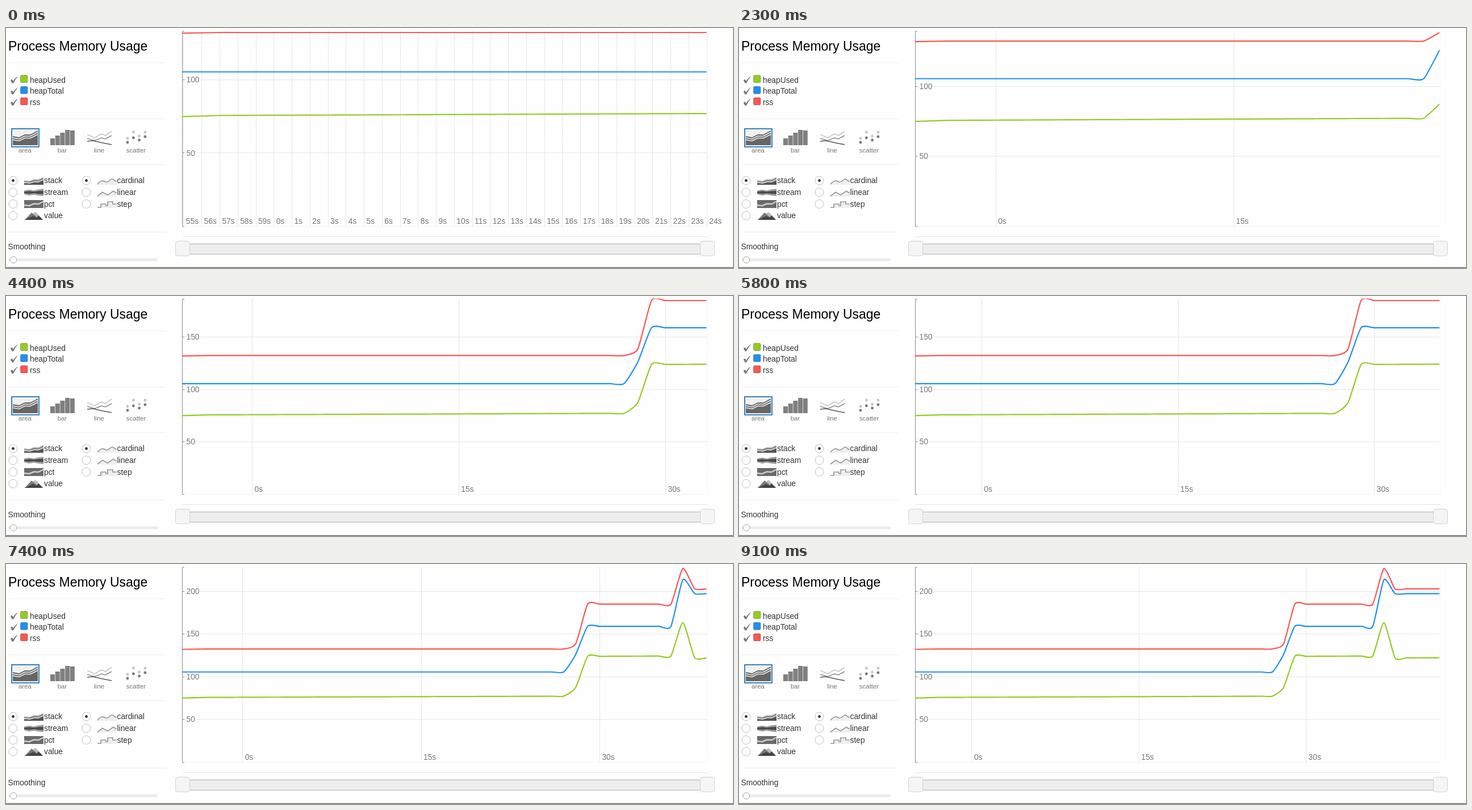
Recreate the animation shown at these times as an HTML page. Size 1280x424 px, loop 9600 ms.

```html
<!DOCTYPE html>
<html lang="en">
<head>
<meta charset="utf-8">
<title>Process Memory Usage</title>
<style>
  html, body { margin: 0; width: 100%; height: 100%; overflow: hidden; background: #fefefe; }
  svg { display: block; width: 1280px; height: 424px; font: 13.8px "Liberation Sans", Arial, sans-serif; fill: #333; }
  .title { font-size: 23px; fill: #000; }
  .small { font-size: 11.5px; fill: #777; text-anchor: middle; }
  .rule { stroke: #dedede; stroke-dasharray: 1 1; }
  .grid { stroke: #cfcfcf; stroke-dasharray: 1 1; }
  .axis { stroke: #8c8c8c; fill: none; }
  .label { fill: #777; stroke: #fefefe; stroke-width: 3px; paint-order: stroke; }
  .line { fill: none; stroke-width: 2.2; }
  .handle { fill: #f5f5f5; stroke: #d2d2d2; }
</style>
</head>
<body>
<svg viewBox="0 0 1280 424">
  <defs>
    <clipPath id="plot"><rect x="309.500" y="4.500" width="924" height="346"/></clipPath>
    <g id="layers">
      <path fill="#c4c4c4" d="M0 6L9 7 17 4 25 4 34 0V14H0z"/>
      <path fill="#777" d="M0 7.500L9 8.500 17 5.500 25 6 34 2V14H0z"/>
      <path fill="#ddd" d="M0 9L10 10 18 7.500 25 8 34 4V6L25 10 18 9.500 10 12 0 11z"/>
      <path fill="#555" d="M0 11L10 12 18 9.500 25 10 34 6V14H0z"/>
    </g>
  </defs>

  <text class="title" x="4" y="40">Process Memory Usage</text>
  <path class="rule" d="M5 61.500H280M5 160.500H280M5 241.500H280M5 360.500H280"/>
  <g id="legend"></g>

  <rect x="10" y="178" width="48" height="32" fill="#f1f1f1" stroke="#3a84bd" stroke-width="2"/>
  <path fill="#666" d="M12 191L23 193 33 188 43 188 56 181V207H12z"/>
  <path fill="none" stroke="#f1f1f1" stroke-width="1.600" d="M12 194L23 196 33 191 43 191 56 184M12 197.500L23 199.500 33 194.500 43 194.500 56 188"/>
  <g id="bars" fill="#808080"></g>
  <g fill="none" stroke-width="1.600">
    <path stroke="#c8c8c8" d="M143 188L156 194 168 187 175 190 186 182"/>
    <path stroke="#8c8c8c" d="M143 195L156 199 168 194 175 196 186 190"/>
    <path stroke="#555" d="M143 200L153 199 170 203 186 206"/>
  </g>
  <g id="dots"></g>
  <text class="small" x="33.500" y="220">area</text>
  <text class="small" x="99" y="220">bar</text>
  <text class="small" x="164" y="220">line</text>
  <text class="small" x="229" y="220">scatter</text>

  <g id="options"></g>
  <use href="#layers" x="32" y="263"/>
  <path fill="#a2a2a2" d="M32 287L41 285.500 49 287 57 285 66 284V297L57 296 49 294.500 41 296 32 294z"/>
  <path fill="#4c4c4c" d="M32 289L41 288 49 289 57 288 66 287.500V293.500L57 293 49 292 41 293 32 292z"/>
  <path fill="#6a6a6a" d="M32 304H66V318H32z"/>
  <path fill="none" stroke="#cfcfcf" stroke-width="2.500" d="M32 313L41 314 49 310.500 57 311 66 306.500"/>
  <path fill="#bbb" d="M32 339L52 325 66 339z"/>
  <path fill="#777" d="M33 339L45 326 60 339z"/>
  <path fill="#444" d="M33 339L48 332 54 335 57 331 65 339z"/>
  <g fill="#eee" stroke="#999" stroke-width="1.700">
    <path stroke="none" d="M161 276Q168 269 174 272T186 267L195 271V277H161z"/>
    <path fill="none" d="M161 276C169 267 171 270 176 272S184 265 188 267 191 271 195 271"/>
    <path stroke="none" d="M161 297L170 290 179 295 189 288 195 292V298H161z"/>
    <path fill="none" d="M161 297L170 290 179 295 189 288 195 292"/>
    <path stroke="none" d="M161 316H167V311H176V314H179V307H188V311H195V318H161z"/>
    <path fill="none" d="M161 317H167V311H176V314H179V307H188V311H195"/>
  </g>

  <text x="3.500" y="390.500">Smoothing</text>
  <rect x="4.500" y="408" width="262" height="3" rx="1.500" fill="#f2f2f2" stroke="#dcdcdc"/>
  <circle cx="13" cy="409.500" r="5.800" fill="#fafafa" stroke="#aaa"/>

  <path stroke="#e4e4e4" d="M310 368.500H1235"/>
  <rect x="311" y="381.500" width="925" height="18" fill="#eee" stroke="#b0b0b0"/>
  <rect class="handle" x="298.500" y="376.500" width="25" height="26" rx="4"/>
  <rect class="handle" x="1222.500" y="376.500" width="25" height="26" rx="4"/>
  <path stroke="#777" stroke-width="1.500" d="M0 423.200H1280"/>

  <g id="chart"></g>
</svg>
<script>
const $ = id => document.getElementById(id);
const LEFT = 309.6, RIGHT = 1233.6, TOP = 4.6, BOTTOM = 349.6;
const START = -5.09, FIRST_END = 24, LAST_END = 42, LOOP = 9600;
const series = [['heapUsed', '#92cc23'], ['heapTotal', '#1e90f2'], ['rss', '#fb5651']];

// time, heapUsed, heapTotal, rss; linear between rows
const knots = [
  [START, 74.7, 105.3, 131.8], [-3, 75.5, 105.3, 132.2], [27, 77, 105.3, 132.2],
  [28, 87.2, 125.9, 138.3], [29, 123.6, 158.7, 184.7], [36, 124, 158.7, 184.7],
  [37, 163, 213.4, 226.4], [38, 121.7, 197, 202.6], [42, 122, 197, 202.6]
];

function sample(time) {
  const i = Math.max(1, knots.findIndex(k => k[0] >= time));
  const a = knots[i - 1], b = knots[i], f = (time - a[0]) / (b[0] - a[0]);
  return a.map((v, j) => v + (b[j] - v) * f);
}

// Cardinal spline, tension 0.8, with quadratic end pieces
function cardinal(p) {
  const n = p.length - 1;
  const handle = (i, k) => [0, 1].map(d => p[i][d] + k * 0.1 * (p[i + 1][d] - p[i - 1][d]));
  let d = `M${p[0]}Q${handle(1, -2 / 3)} ${p[1]}`;
  for (let i = 2; i < n; i++) d += `C${handle(i - 1, 1)} ${handle(i, -1)} ${p[i]}`;
  return d + `Q${handle(n - 1, 2 / 3)} ${p[n]}`;
}

function drawChart(end) {
  const data = [sample(START)];
  for (let s = -3; s <= end; s++) data.push(sample(s));
  const top = 1.01 * Math.max(...data.map(row => row[3]));
  const x = s => LEFT + (s - START) / (end - START) * (RIGHT - LEFT);
  const y = v => BOTTOM - v / top * (BOTTOM - TOP);
  const crisp = v => Math.round(v) + 0.5;
  let grid = '<path class="grid" opacity=".4" d="M310 350.5H1234M1234.5 5V350"/>';
  let labels = '', axis = 'M314 5.5H310.5V350.5H314';

  const unit = end - START >= 30 ? 15 : 1;
  for (let s = Math.ceil(START / unit) * unit; s <= end; s += unit) {
    grid += `<path class="grid" d="M${crisp(x(s))} 5V350"/>`;
    labels += `<text class="label" x="${x(s) + 4.4}" y="346">${(s + 60) % 60}s</text>`;
  }
  for (let v = 50; v < top; v += 50) {
    grid += `<path class="grid" d="M310 ${crisp(y(v))}H1234"/>`;
    axis += `M310 ${crisp(y(v))}h4`;
    labels += `<text class="label" x="317.5" y="${y(v) + 5.2}">${v}</text>`;
  }
  const lines = series.map(([, color], i) =>
    `<path class="line" stroke="${color}" d="${cardinal(data.map(r => [x(r[0]), y(r[i + 1])]))}"/>`);
  $('chart').innerHTML = `${grid}${labels}<path class="axis" d="${axis}"/>
    <g clip-path="url(#plot)">${lines.reverse().join('')}</g>`;
}

function drawPanel() {
  $('legend').innerHTML = series.map(([name, color], i) => `<g transform="translate(0 ${i * 19.7})">
    <path fill="#777" d="M8 92.500q1.800-2.500 3.500-.8l1.200 2Q16 88 21 85.200 16 91 13 97.500h-2.500z"/>
    <rect x="25.500" y="83.500" width="12.500" height="13" rx="2" fill="${color}" stroke="#0004"/>
    <text x="42" y="96.500">${name}</text></g>`).join('');
  $('bars').innerHTML = [195, 190, 185, 180, 181].map((y, i) =>
    `<rect x="${78 + i * 8.7}" y="${y}" width="8" height="${207 - y}"/>`).join('');
  $('dots').innerHTML = [[195, 202], [184, 194], [191, 198], [184, 192]].map((column, i) =>
    column.map((y, dark) =>
      `<circle cx="${214 + i * 10.3}" cy="${y}" r="2.4" fill="${dark ? '#777' : '#c4c4c4'}"/>`).join('')).join('');
  const options = (names, x, textX) => names.map((name, i) => {
    const y = 269.5 + i * 20.7;
    return `<circle cx="${x}" cy="${y}" r="7.5" fill="#fff" stroke="#bdbdbd"/>
      ${i ? '' : `<circle cx="${x}" cy="${y}" r="2.4"/>`}
      <text x="${textX}" y="${y + 4.7}">${name}</text>`;
  }).join('');
  $('options').innerHTML = options(['stack', 'stream', 'pct', 'value'], 12.5, 67)
    + options(['cardinal', 'linear', 'step'], 141.5, 195.5);
}

let shown;
function tick() {
  const ms = performance.now() % LOOP;
  // one new sample every half second
  const end = Math.min(LAST_END, FIRST_END + Math.floor((ms + 100) / 500));
  if (end !== shown) drawChart(shown = end);
  requestAnimationFrame(tick);
}
drawPanel();
tick();
</script>
</body>
</html>
```
